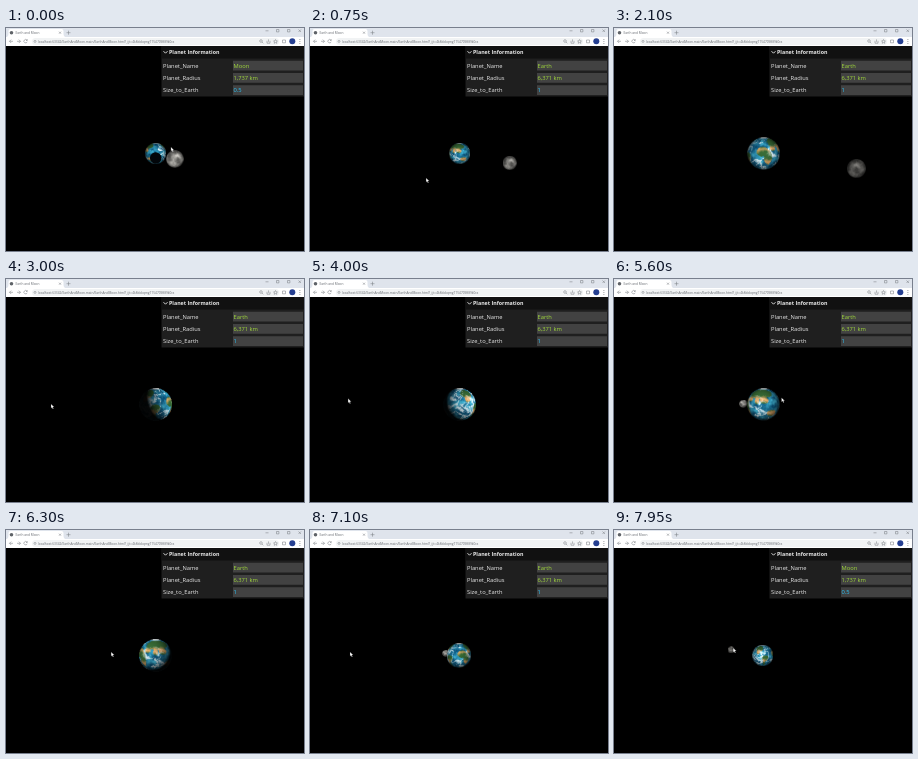
An HTML page with a canvas for the animation above (8 s loop, 298x223 px).

```html
<!DOCTYPE html>
<html lang="en">
<head>
<meta charset="utf-8">
<title>Earth and Moon</title>
<style>
  html, body { margin: 0; width: 100%; height: 100%; overflow: hidden; background: #000; }
  canvas, svg { position: absolute; left: 0; top: 0; width: 298px; height: 223px; }
  text { font-family: "Open Sans", "Noto Sans", sans-serif; }
  .tiny { font-size: 3.2px; fill: #666a70; }
  .panel text { font-size: 5.75px; font-weight: 500; fill: #ebebeb; }
  .panel .head { font-size: 5.3px; font-weight: 700; }
  .panel .string { fill: #a2db3c; }
  .panel .number { fill: #2cc9ff; }
  .icon { fill: none; stroke: #7b7f85; stroke-width: .55; }
</style>
</head>
<body>
<canvas id="space" width="298" height="223"></canvas>
<svg viewBox="0 0 298 223">
  <!-- browser window -->
  <path fill="#dfe4ec" d="M0 0h298v9H0z"/>
  <path fill="#fff" d="M0 9h298v9H0zM1 9q1.500-1 1.500-3V3q0-2 2-2h51q2 0 2 2v3q0 2 1.500 3z"/>
  <circle cx="5.500" cy="4.800" r="1.800" fill="#5f6368"/>
  <text class="tiny" x="9.500" y="6">Earth and Moon</text>
  <path class="icon" d="M53 3.700l2 2m0-2l-2 2M60.500 4.700h4m-2-2v4M259.500 2.800h3M270.500 1.500h2.400v2.400h-2.400zM281.500 1.500h2.400v2.400h-2.400zM292.500 1.500l2.500 2.500m0-2.500l-2.500 2.500"/>
  <path class="icon" d="M7 13.300H3.500m1.700-1.700l-1.700 1.700 1.700 1.700M11 13.300h3.500m-1.700-1.700l1.700 1.700-1.700 1.700M21 12.200a1.700 1.700 0 1 0 .2 1.600m.1-2.600v1.300h-1.300"/>
  <rect x="26" y="10" width="247" height="7" rx="3.500" fill="#f1f3f4"/>
  <circle class="icon" cx="29" cy="13.400" r="1"/>
  <text class="tiny" x="32" y="14.500">localhost:63342/EarthAndMoon.main/EarthAndMoon.html?_ijt=4k8dokqmg7154709889k0cs</text>
  <path class="icon" d="M256 14l1.300 1.300M261 12.800v2.400h3v-2.400m-1.500 1v-2.400M269.500 11.500l.6 1.300 1.400.1-1 1 .3 1.400-1.300-.7-1.300.7.3-1.400-1-1 1.400-.1zM276.500 12h3v2.800h-3z"/>
  <circle class="icon" cx="255" cy="13" r="1.300"/>
  <circle cx="286.300" cy="13.300" r="3" fill="#253f91"/>
  <path fill="#5f6368" d="M293.500 11h.8v.8h-.8zm0 2h.8v.8h-.8zm0 2h.8v.8h-.8z"/>
  <!-- info panel -->
  <g class="panel">
    <path fill="#1f1f1f" d="M155.500 18h142.500v50.500H155.500z"/>
    <path fill="#111" d="M155.500 18h142.500v12.500H155.500z"/>
    <path fill="#424242" d="M227 32.800h70v9.700h-70zm0 12.200h70v9.700h-70zm0 12.200h70v9.700h-70z"/>
    <path d="M157.500 23.200l2 2 2-2" fill="none" stroke="#ebebeb" stroke-width=".9"/>
    <text class="head" x="163" y="26.200">Planet Information</text>
    <text x="157" y="39.600">Planet_Name</text>
    <text x="157" y="51.800">Planet_Radius</text>
    <text x="157" y="64">Size_to_Earth</text>
    <text class="string" id="name" x="227.500" y="39.600">Moon</text>
    <text class="string" id="radius" x="227.500" y="51.800">1,737 km</text>
    <text class="number" id="size" x="227.500" y="64">0.5</text>
  </g>
  <path id="cursor" d="M0 0v4.300l1-.9.800 1.700.8-.4-.8-1.600h1.400z" fill="#fff" stroke="#222" stroke-width=".25"/>
</svg>
<script>
const LOOP = 8, W = 256, H = 128, N = 64, TAU = 2 * Math.PI;
const $ = id => document.getElementById(id);
const ctx = $('space').getContext('2d');
ctx.imageSmoothingQuality = 'high';

const clamp = v => Math.min(1, Math.max(0, v));
const lerp = (a, b, k) => a + (b - a) * k;
const mix = (a, b, k) => a.map((v, i) => lerp(v, b[i], k));
const smooth = k => k * k * (3 - 2 * k);
const ease = (t, from, to) => smooth(clamp((t - from) / (to - from)));
const pulse = (t, a, b, c, d) => ease(t, a, b) - ease(t, c, d);

function along(keys, t) {
  const i = Math.max(1, keys.findIndex(key => key[0] >= t));
  const a = keys[i - 1], b = keys[i];
  return mix(a, b, (t - a[0]) / (b[0] - a[0])).slice(1);
}

// Seconds, orbit angle seen from the camera (90 is nearest), slant of the orbit.
const orbitKeys = [[0, 78, .7], [.75, 48, .7], [2.5, 14, .66], [3, -92, 0], [4.2, -98, 0],
  [5.4, -130, -.1], [6, -95, 0], [6.7, -95, .3], [8, -150, .72]];
// Seconds, x, y.
const cursorKeys = [[0, 165, 119], [.75, 116, 150], [1.25, 150, 130], [2.2, 145, 126], [3, 45, 125],
  [4.3, 36, 118], [4.8, 270, 116], [5.2, 270, 116], [6.1, 40, 122], [6.6, 202, 122],
  [7.2, 8, 122], [7.65, 114, 118], [8, 120, 118]];

function earthAt(t) {
  const out = ease(t, 6.6, 7.4);
  return { x: 149.7 - out, y: 125.5, r: 10.7 + 5.6 * (ease(t, 1.3, 2.05) - out) };
}

function moonAt(t, earth) {
  const [degrees, slant] = along(orbitKeys, t), angle = degrees * TAU / 360;
  const cos = Math.cos(angle), sin = Math.sin(angle);
  const near = earth.r / (1 - .0467 * earth.r * sin);
  return {
    x: earth.x + 4.4 * cos * near,
    y: earth.y + (.12 * sin + slant * cos) * near,
    r: .42 * near, front: sin > 0, gain: .35 + .7 * Math.abs(sin)
  };
}

function facingLongitude(t) {
  const drag = t > 4.2 && t < 7 ? 28 * Math.sin((t - 5.6) / 2.8 * TAU) : 0;
  return 170 - 76 * t + drag;
}

function lightAt(t) {
  const side = pulse(t, 2.3, 3, 3.4, 4.8), above = pulse(t, 5.2, 6.2, 6.5, 7.4);
  return [.85 * side - .4 * above, .1 + .25 * side + .3 * above, 1 - .55 * side - .2 * above];
}

const hash = (x, y) => { const s = Math.sin(x * 127.1 + y * 311.7) * 43758.545; return s - Math.floor(s); };
function noise(x, y, wrap) {
  const ix = Math.floor(x), iy = Math.floor(y), u = smooth(x - ix), v = smooth(y - iy);
  const p = (a, b) => hash((ix + a) % wrap, iy + b);
  return lerp(lerp(p(0, 0), p(1, 0), u), lerp(p(0, 1), p(1, 1), u), v);
}
function fractal(x, y, cells) {
  let sum = 0, amp = .53;
  for (let o = 1; o <= 8; o *= 2, amp /= 2) sum += amp * noise((x / W + 1) * cells * o, y / H * cells * o / 2 + o * 9, cells * o);
  return sum;
}
function makeTexture(color) {
  const out = new Float32Array(W * H * 3);
  for (let y = 0; y < H; y++) for (let x = 0; x < W; x++) out.set(color(x, y), (y * W + x) * 3);
  return out;
}

// Continents as ellipses: longitude, latitude, half width, half height.
const lands = [[5, 16, 23, 19], [26, -8, 16, 28], [85, 50, 65, 23], [78, 20, 9, 13], [46, 25, 12, 12],
  [106, 24, 17, 16], [-100, 50, 32, 20], [-103, 26, 11, 13], [-60, -8, 19, 17], [-66, -34, 9, 20], [134, -25, 20, 13]];

const earthMap = makeTexture((x, y) => {
  const lon = x / W * 360 - 180, lat = 90 - y / H * 180;
  const rough = fractal(x, y, 24), warp = fractal(x, y, 12) - .5;
  const inside = Math.max(...lands.map(([a, b, w, h]) => 1 - Math.hypot((lon - a) / w, (lat - b) / h)));
  const land = clamp((inside + (rough - .5) * .5) * 12);
  const dry = clamp(1.2 - Math.abs(Math.abs(lat) - 24) / 12 + (rough - .5) * 2);
  const sea = mix([8, 72, 108], [62, 168, 196], clamp(rough * 2 - .5));
  const soil = mix([48, 92, 46], [200, 150, 92], dry);
  const swirl = fractal(x + warp * 60 + y * .6, y + warp * 26, 10);
  const cloud = clamp(1.1 - Math.abs(swirl - .52) * 17) * (1 - .6 * land);
  const ice = clamp((Math.abs(lat) - 70) / 8);
  return mix(mix(sea, soil, land), [238, 246, 248], Math.max(cloud * .9, ice));
});
const moonMap = makeTexture((x, y) => {
  const v = 40 + 220 * fractal(x, y, 12);
  return [v, v * .99, v * .96];
});

const ball = document.createElement('canvas');
ball.width = ball.height = N;
const ballCtx = ball.getContext('2d');
const pixels = ballCtx.createImageData(N, N);

function drawSphere(map, { x, y, r, gain = 1.1 }, lon, light) {
  const size = Math.hypot(...light), tilt = .12, c = Math.cos(tilt), s = Math.sin(tilt);
  for (let j = 0, o = 0; j < N; j++) for (let i = 0; i < N; i++, o += 4) {
    const u = (i + .5) / N * 2 - 1, v = 1 - (j + .5) / N * 2, d = u * u + v * v;
    pixels.data[o + 3] = 0;
    if (d >= 1) continue;
    const z = Math.sqrt(1 - d), up = v * c + z * s, near = z * c - v * s;
    const turn = Math.atan2(u, near) / TAU + lon / 360 + .5;
    const tx = Math.floor((turn - Math.floor(turn)) * W) % W;
    const ty = Math.min(H - 1, Math.floor(Math.acos(Math.max(-1, Math.min(1, up))) / Math.PI * H));
    const facing = Math.max(0, (u * light[0] + v * light[1] + z * light[2]) / size);
    const shade = (.03 + 1.05 * Math.pow(facing, .8)) * gain;
    for (let k = 0; k < 3; k++) pixels.data[o + k] = map[(ty * W + tx) * 3 + k] * shade;
    pixels.data[o + 3] = 255;
  }
  ballCtx.putImageData(pixels, 0, 0);
  ctx.drawImage(ball, x - r, y - r, 2 * r, 2 * r);
}

function drawEclipse({ x, y, r }, t) {
  ctx.save();
  ctx.beginPath(); ctx.arc(x, y, r, 0, TAU); ctx.clip();
  ctx.globalAlpha = 1 - ease(t, .35, .6);
  ctx.fillStyle = '#02060a';
  ctx.beginPath(); ctx.arc(x + t * 22, y + 4.5 + t * 4, 5.8, 0, TAU); ctx.fill();
  ctx.restore();
}

function showInfo(isMoon) {
  $('name').textContent = isMoon ? 'Moon' : 'Earth';
  $('radius').textContent = isMoon ? '1,737 km' : '6,371 km';
  $('size').textContent = isMoon ? '0.5' : '1';
}

function render(t) {
  const earth = earthAt(t), moon = moonAt(t, earth), light = lightAt(t);
  const drawMoon = () => drawSphere(moonMap, moon, 40 + t * 10, light);
  ctx.clearRect(0, 0, 298, 223);
  if (!moon.front) drawMoon();
  drawSphere(earthMap, earth, facingLongitude(t), light);
  drawEclipse(earth, t);
  if (moon.front) drawMoon();

  const [x, y] = along(cursorKeys, t);
  $('cursor').setAttribute('transform', `translate(${x} ${y})`);
  $('cursor').setAttribute('visibility', t > 1.25 && t < 2.2 ? 'hidden' : 'visible');
  const visible = Math.hypot(moon.x - earth.x, moon.y - earth.y) > earth.r;
  showInfo(visible && Math.hypot(moon.x - x, moon.y - y) < moon.r + 5);
}

const start = performance.now();
function tick() {
  render((performance.now() - start) / 1000 % LOOP);
  requestAnimationFrame(tick);
}
tick();
</script>
</body>
</html>
```
